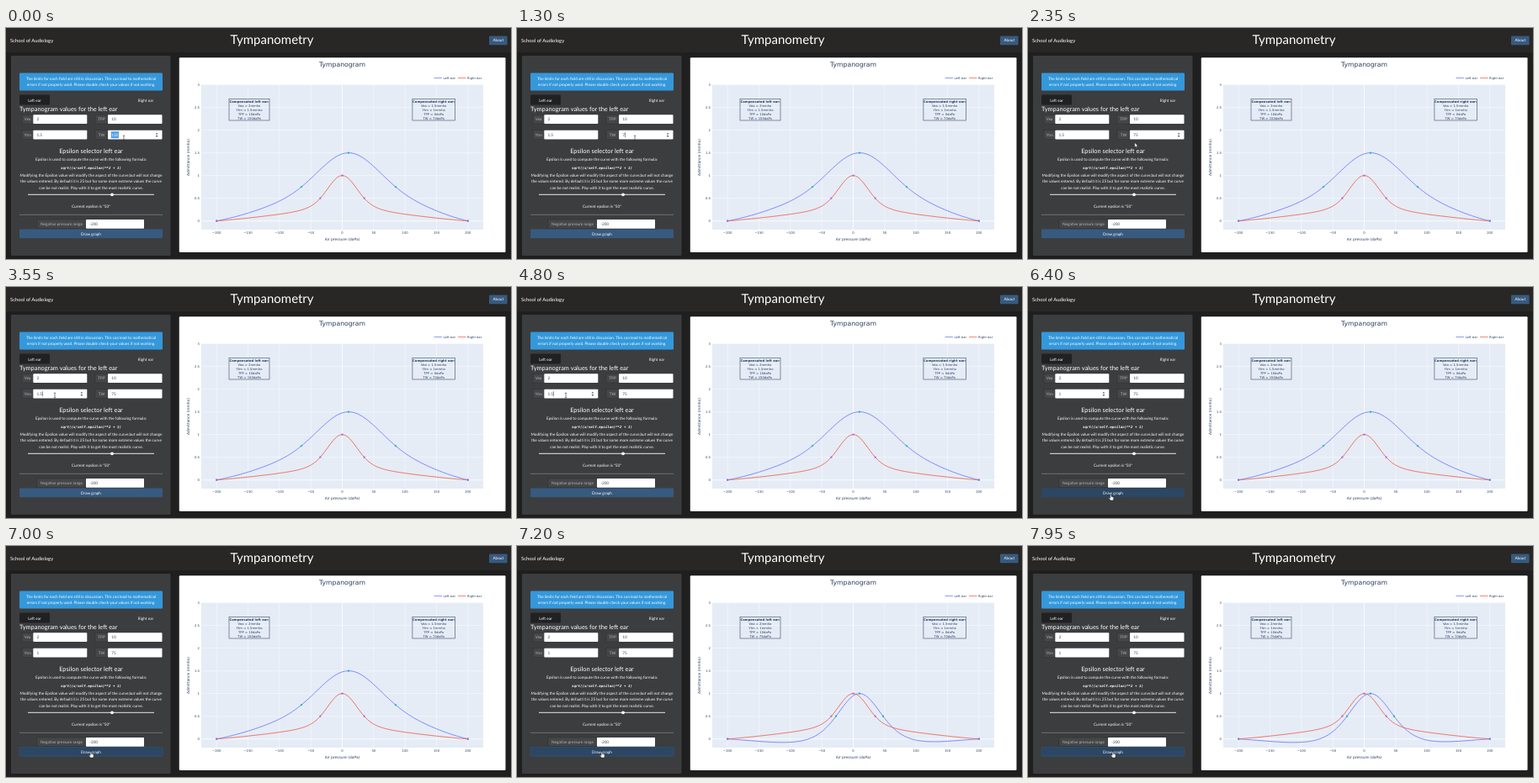
An HTML page that plays this animation: 600 px wide and 275 px high, repeating every 8000 ms.

```html
<!DOCTYPE html>
<html lang="en">
<head>
<meta charset="utf-8">
<title>Tympanometry</title>
<style>
html, body { margin: 0; width: 100%; height: 100%; overflow: hidden; background: #1f1f20; }
svg { display: block; width: 600px; height: 275px; text-rendering: geometricPrecision; }
text { font-family: Lato, sans-serif; font-size: 4.69px; fill: #fff; white-space: pre; }
.plot text { font-family: "DejaVu Sans", sans-serif; font-size: 3.75px; fill: #2a3f5f; }
.mid { text-anchor: middle; }
.end { text-anchor: end; }
</style>
</head>
<body>
<svg id="stage" viewBox="0 0 600 275"></svg>
<script>
const stage = document.getElementById("stage");

function add(parent, tag, attrs, content) {
  const node = document.createElementNS("http://www.w3.org/2000/svg", tag);
  for (const key in attrs) node.setAttribute(key, attrs[key]);
  if (content !== undefined) node.textContent = content;
  parent.appendChild(node);
  return node;
}
const rect = (p, x, y, width, height, fill, more) =>
  add(p, "rect", { x, y, width, height, fill, ...more });
const line = (p, x1, y1, x2, y2, stroke, width) =>
  add(p, "line", { x1, y1, x2, y2, stroke, "stroke-width": width });
function label(p, x, y, str, align = "", size, more = {}) {
  const node = add(p, "text", { x, y, class: align, ...more }, str);
  if (size) node.style.fontSize = size + "px";
  return node;
}

// Header
rect(stage, 0, 0, 600, 275, "#1f1f20");
rect(stage, 0, 0, 600, 29, "#282725");
label(stage, 5, 16.8, "School of Audiology", "", 5.86);
label(stage, 316, 19.1, "Tympanometry", "mid", 15);
rect(stage, 574, 9.4, 21.6, 10.8, "#375a7f", { rx: 1 });
label(stage, 584.8, 16.4, "About", "mid");

// Form panel
rect(stage, 6, 33, 189.5, 238, "#3c3d3f", { rx: 1 });
rect(stage, 16, 53.5, 170, 21, "#3498db", { rx: 1.2 });
label(stage, 101, 62.4, "The limits for each field are still in discussion. This can lead to mathematical", "mid");
label(stage, 101, 69.4, "errors if not properly used. Please double check your values if not working.", "mid");
rect(stage, 16, 79.5, 36, 12, "#202122", { rx: 1 });
label(stage, 34, 87.5, "Left ear", "mid");
label(stage, 166, 87.5, "Right ear", "mid");
label(stage, 16, 99, "Tympanogram values for the left ear", "", 7.4);

function field(x, y, addon, width, name, value) {
  rect(stage, x, y, addon, 10.8, "#444648", { stroke: "#292a2b", "stroke-width": .4 });
  label(stage, x + addon / 2, y + 7.2, name, "mid", 0, { style: "fill:#b4b9be" });
  rect(stage, x + addon, y, width, 10.8, "#fff", { rx: .8 });
  const left = x + addon + 4.2;
  const mark = rect(stage, left - .4, y + 1.5, 9.2, 8, "#4f9fea", { opacity: 0 });
  const text = label(stage, left, y + 7.2, value, "", 0, { style: "fill:#444" });
  const spin = add(stage, "path", {
    d: `M${x + addon + width - 7.8} ${y + 4.9}l1.4 -1.9l1.4 1.9zm0 1.4l1.4 1.9l1.4 -1.9z`, fill: "#555", opacity: 0
  });
  const caret = rect(stage, 0, y + 2.6, .5, 6, "#222", { opacity: 0 });
  return { mark, text, spin, caret, left };
}
field(19, 103.2, 13.3, 64, "Vea", "2");
field(106, 103.2, 15, 64.5, "TPP", "10");
const ytm = field(19, 121.7, 13.3, 64, "Ytm", "1.5");
const tw = field(106, 121.7, 15, 64.5, "TW", "150");

label(stage, 101, 148.7, "Epsilon selector left ear", "mid", 7.4);
label(stage, 101, 157.6, "Epsilon is used to compute the curve with the following formula:", "mid");
label(stage, 101, 168, "sqrt((x/self.epsilon)**2 + 1)", "mid", 4.13,
  { style: 'font-family:"DejaVu Sans Mono",monospace;font-weight:bold;font-style:italic' });
[
  "Modifying the Epsilon value will modify the aspect of the curve,but will not change",
  "the values entered. By default it is 25 but for some more extreme values the curve",
  "can be not realist. Play with it to get the most realistic curve."
].forEach((str, i) => label(stage, 101, 177.3 + i * 7.1, str, "mid"));
line(stage, 26, 198.3, 176, 198.3, "#e9e9e9", 1);
add(stage, "circle", { cx: 126, cy: 198.3, r: 1.9, fill: "#fff" });
label(stage, 101, 213.8, 'Current epsilon is "50"', "mid");
line(stage, 16, 222.3, 186, 222.3, "#85878a", .7);
field(37, 228, 58, 69, "Negative pressure range", "-200");
const button = rect(stage, 16, 239.6, 170, 10.7, "#375a7f", { rx: 1, "stroke-width": .6 });
label(stage, 101, 246.6, "Draw graph", "mid");

// Chart
const plot = add(stage, "g", { class: "plot" });
const px = v => 399.5 + v * .7465;
const py = v => 229.7 - v * 54.05;
rect(plot, 205.8, 35.2, 387.7, 231.8, "#fff", { rx: 1 });
rect(plot, 232, 67.3, 335, 172.7, "#e5ecf6");
label(plot, 399.5, 46, "Tympanogram", "mid", 7.7);
for (let v = -200; v <= 200; v += 50) {
  line(plot, px(v), 67.3, px(v), 240, "#fff", v ? .45 : .8);
  label(plot, px(v), 245.2, String(v).replace("-", "\u2212"), "mid");
}
for (let v = 0; v <= 3; v += .5) {
  line(plot, 232, py(v), 567, py(v), "#fff", v ? .45 : .8);
  label(plot, 230, py(v) + 1.4, v, "end");
}
label(plot, 399.5, 253.4, "Air pressure (daPa)", "mid", 4.375);
label(plot, 0, 0, "Admittance (mmho)", "mid", 4.375, { transform: "translate(218.3 154) rotate(-90)" });
line(plot, 508.5, 59.5, 518, 59.5, "#636efa", .7);
label(plot, 519.6, 60.9, "Left ear");
line(plot, 537, 59.5, 546.5, 59.5, "#ef553b", .7);
label(plot, 548, 60.9, "Right ear");

// Multiquadric interpolation through the five key points
function interpolate(xs, ys, eps) {
  const phi = r => Math.sqrt((r / eps) ** 2 + 1);
  const n = xs.length;
  const m = xs.map((a, i) => [...xs.map(b => phi(a - b)), ys[i]]);
  for (let c = 0; c < n; c++) {
    let best = c;
    for (let r = c + 1; r < n; r++) if (Math.abs(m[r][c]) > Math.abs(m[best][c])) best = r;
    [m[c], m[best]] = [m[best], m[c]];
    for (let r = 0; r < n; r++) {
      if (r === c) continue;
      const k = m[r][c] / m[c][c];
      for (let j = c; j <= n; j++) m[r][j] -= k * m[c][j];
    }
  }
  const weights = m.map((row, i) => row[n] / row[i]);
  return x => weights.reduce((sum, w, i) => sum + w * phi(x - xs[i]), 0);
}

function ear(parent, side, cx, half, vea, peak, tpp, width, eps, stroke, dot) {
  const g = add(parent, "g", {});
  const xs = [-200, tpp - width / 2, tpp, tpp + width / 2, 200];
  const ys = [0, peak / 2, peak, peak / 2, 0];
  const f = interpolate(xs, ys, eps);
  let d = "";
  for (let x = -200; x <= 200; x += 2) d += (d ? "L" : "M") + px(x).toFixed(2) + " " + py(f(x)).toFixed(2);
  add(g, "path", { d, fill: "none", stroke, "stroke-width": .8, "stroke-linejoin": "round" });
  xs.forEach((x, i) => add(g, "circle", { cx: px(x), cy: py(ys[i]), r: 1.15, fill: dot }));
  rect(g, cx - half, 84.3, half * 2, 25.7, "none", { stroke: "#3d4c66", "stroke-width": .6 });
  label(g, cx, 89, `Compensated ${side} ear:`, "mid", 0, { "font-weight": "bold" });
  [`Vea = ${vea}mmho`, `Ytm = ${peak}mmho`, `TPP = ${tpp}daPa`, `TW = ${width}daPa`]
    .forEach((str, i) => label(g, cx, 93.9 + i * 4.9, str, "mid"));
  return g;
}
const before = ear(plot, "left", 289, 24, 2, 1.5, 10, 150, 50, "#636efa", "#00bfb0");
const after = ear(plot, "left", 289, 24, 2, 1, 10, 75, 50, "#636efa", "#00bfb0");
ear(plot, "right", 508.2, 25.3, 1.5, 1, 0, 70, 25, "#ef553b", "#ab63fa");

// Pointer shapes, each with its hot spot at 0,0
const shapes = {
  beam: add(stage, "path", { d: "M-1.2 -2.8h2.4M0 -2.8v5.6M-1.2 2.8h2.4", stroke: "#333", "stroke-width": .6, fill: "none" }),
  arrow: add(stage, "path", { d: "M0 -1.5v5.4l1.3 -1.2l.9 2l.9 -.4l-.9 -1.9h1.7z", fill: "#fff", stroke: "#111", "stroke-width": .4 }),
  hand: add(stage, "path", {
    d: "M-.9 -2.4q.7 -.8 1.3 0v2l2 .4q.9 .3 .8 1.2l-.5 2.8h-3.2l-2 -2.5q-.2 -.9 .7 -.6l.9 .7z",
    fill: "#fff", stroke: "#111", "stroke-width": .4
  })
};

// time, x, y, shape
const route = [
  [0, 140, 131, "beam"], [1900, 140, 131, "beam"], [2000, 127, 138, "arrow"],
  [2350, 127, 138, "arrow"], [2550, 80, 141, "arrow"], [2850, 80, 141, "arrow"],
  [3050, 76, 136, "arrow"], [3350, 76, 136, "beam"], [3500, 58, 129, "beam"],
  [5600, 58, 129, "beam"], [5750, 68, 160, "arrow"], [6200, 98.6, 250, "hand"],
  [6650, 98.6, 250, "hand"], [6850, 101, 248, "hand"], [8000, 101, 248, "hand"]
];
const typedTw = [[0, "150"], [1250, "7"], [1350, "75"]];
const typedYtm = [[0, "1.5"], [5000, "1."], [5300, "1"]];
const at = (steps, t) => steps.filter(s => s[0] <= t).pop()[1];
const show = (node, on) => node.setAttribute("opacity", on ? 1 : 0);

function input(f, value, focused, caret, selected) {
  f.text.textContent = value;
  f.text.style.fill = selected ? "#fff" : "#444";
  show(f.mark, selected);
  show(f.spin, focused);
  show(f.caret, caret);
  f.caret.setAttribute("x", f.left + f.text.getComputedTextLength() + .3);
}

function draw(t) {
  input(tw, at(typedTw, t), t < 3450, t >= 1250 && t < 1900, t < 1250);
  input(ytm, at(typedYtm, t), t >= 3450 && t < 6850, t >= 3450 && t < 5600, false);
  button.setAttribute("fill", t < 6250 ? "#375a7f" : "#2b4764");
  button.setAttribute("stroke", t < 6850 ? "none" : "#34557a");
  show(before, t < 7150);
  show(after, t >= 7150);

  const i = Math.max(1, route.findIndex(p => p[0] > t));
  const a = route[i - 1], b = route[i];
  const k = (t - a[0]) / (b[0] - a[0]);
  const x = a[1] + (b[1] - a[1]) * k, y = a[2] + (b[2] - a[2]) * k;
  for (const name in shapes) {
    show(shapes[name], name === a[3]);
    shapes[name].setAttribute("transform", `translate(${x} ${y})`);
  }
}

const start = performance.now();
function tick() {
  draw((performance.now() - start) % 8000);
  requestAnimationFrame(tick);
}
tick();
</script>
</body>
</html>
```
